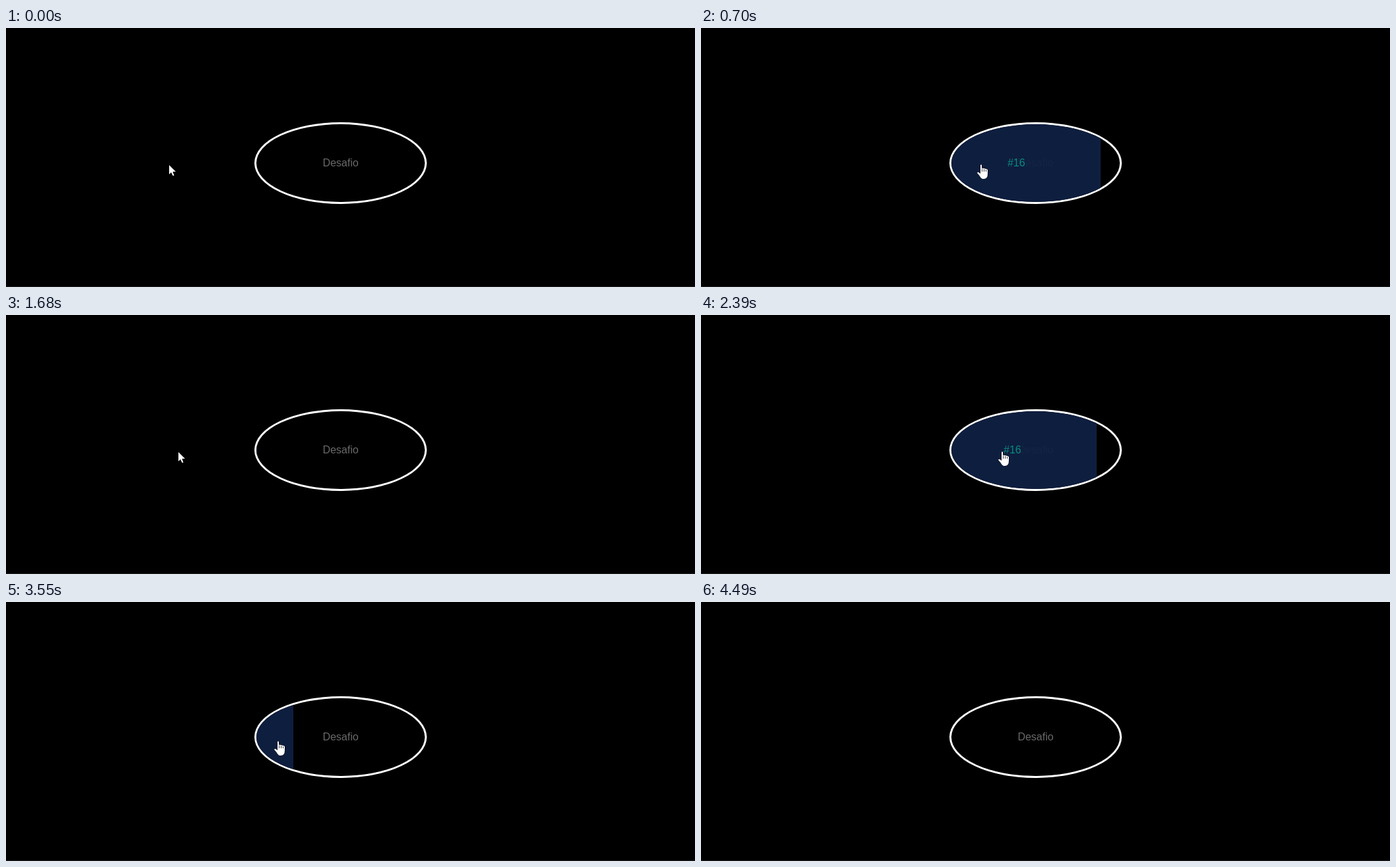
Animation, 1043 px wide and 393 px high, one loop 5210 ms. Source, as an HTML page:

```html
<!DOCTYPE html>
<html lang="pt">
<head>
<meta charset="utf-8">
<style>
  html, body { margin: 0; width: 100%; height: 100%; overflow: hidden; background: #000; }
  body { box-shadow: inset 0 -1px #1c1c1c; }
  #button {
    position: absolute; left: 376px; top: 143px; width: 255px; height: 118px;
    border: 3px solid #fff; border-radius: 50%; overflow: hidden;
    font: 16px/118px "Liberation Sans", Arial, sans-serif; text-align: center; color: #696969;
  }
  #panel { position: absolute; top: 0; width: 100%; height: 100%; background: rgba(15, 32, 67, .95); color: #0a8a7e; }
  svg { position: absolute; left: 0; top: 0; }
</style>
</head>
<body>
<div id="button">Desafio<div id="panel">#16</div></div>
<svg width="1043" height="393">
  <g id="cursor" stroke="#000" paint-order="stroke" fill="#fff">
    <path id="arrow" d="M0 0V14L3 11L5.5 16H7.5L5.5 10H10Z"/>
    <g id="hand">
      <path d="M5 0Q6 -1.6 7 0V5Q8.5 3.7 10 5.3Q11.5 4.4 13 6Q15 5.4 16 7.5V13Q16 21 10 21H9Q6 21 3.5 16L0 12Q1 10 3 11.5L5 13Z"/>
      <path d="M7.5 5.5V10M10.5 6V10M13.5 7V10" stroke-width=".8"/>
    </g>
  </g>
</svg>
<script>
const LOOP = 5210, TICK = 141, LAG = 30, HOVER = 500, END = 32;
const byId = id => document.getElementById(id);

// Where the pointer turns or rests: tick, x, y
const path = [
  [1, 247, 208], [2, 321, 208], [4, 418, 208], [8, 418, 208], [9, 310, 208], [11, 261, 208],
  [12, 261, 208], [14, 317, 208], [17, 450, 208], [20, 450, 208], [21, 376, 210], [22, 324, 212],
  [24, 356, 212], [25, 406, 212], [26, 414, 212], [28, 303, 212], [30, 303, 212], [31, 523, 290]
];

// Times at which the pointer enters and leaves the button, in turn
const toggles = [405, 1228, 2113, 2968, 3442, 3801];

// The CSS "ease" curve: cubic-bezier(.25, .1, .25, 1)
function ease(x) {
  let lo = 0, hi = 1;
  for (let i = 0; i < 24; i++) {
    const s = (lo + hi) / 2;
    if (.75 * s * (1 - s) + s ** 3 < x) lo = s; else hi = s;
  }
  return .3 * (1 - lo) ** 2 * lo + 3 * (1 - lo) * lo * lo + lo ** 3;
}

// Each toggle reverses the slide from wherever it is, in proportionally less time
function slideAt(t) {
  const i = toggles.findLastIndex(start => start < t);
  if (i < 0) return 0;
  const from = slideAt(toggles[i]), gap = (i + 1) % 2 - from;
  return from + gap * ease(Math.min(1, (t - toggles[i]) / (HOVER * Math.abs(gap))));
}

function pointerAt(tick) {
  const i = path.findIndex(p => p[0] >= tick);
  if (i < 1) return path.at(i).slice(1);
  const [a, ax, ay] = path[i - 1], [b, bx, by] = path[i];
  const k = 1 - ((b - tick) / (b - a)) ** 2;
  return [ax + (bx - ax) * k, ay + (by - ay) * k].map(Math.round);
}

function show(id, on) {
  byId(id).style.display = on ? "" : "none";
}

function draw() {
  const tick = Math.floor((performance.now() % LOOP + LAG) / TICK);
  const [x, y] = pointerAt(tick), over = x > 370 && y < 270;
  byId("panel").style.left = 255 * (slideAt(tick * TICK) - 1) + "px";
  byId("cursor").setAttribute("transform", `translate(${x} ${y})`);
  show("cursor", tick < END);
  show("arrow", !over);
  show("hand", over);
  requestAnimationFrame(draw);
}
draw();
</script>
</body>
</html>
```
